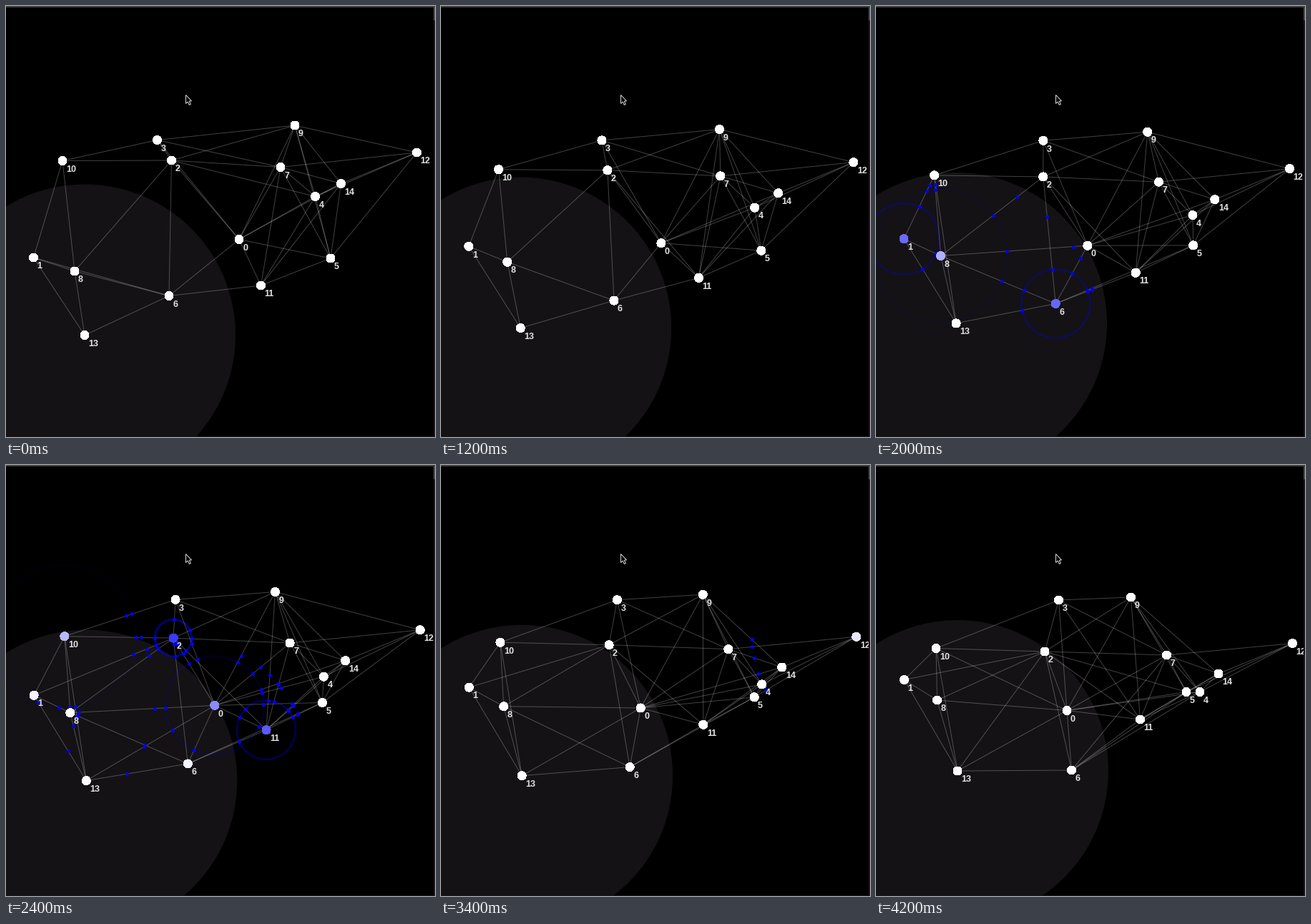
Recreate the animation shown at these times as a matplotlib script. Size 600 px wide and 603 px high, loop 4300 ms.

```python
from itertools import combinations

import matplotlib.pyplot as plt
import numpy as np
from matplotlib.animation import FuncAnimation
from matplotlib.collections import LineCollection
from matplotlib.patches import Circle, Polygon, Rectangle

W, H, DPI = 600, 603, 96
PX = 72 / DPI              # points per pixel
FRAMES, STEP = 43, 100
REACH = 211                # radio range of a node
SOURCE = 13                # node that sends the first pulse
WAVE = 1720                # pixels a pulse travels over the whole drift
LAUNCH = 0.396             # drift progress at the first pulse
LATENCY = 7 / WAVE         # pause before a node relays a pulse

# Start point and total drift of each node
NODES = np.array([
    (325.5, 326, -59, 17), (38, 351.5, 1, -51.5), (231, 215.5, 4.5, 45),
    (211, 187, 44, 1.5), (432, 266, 20.5, 51), (453.5, 352.5, -20, -35.5),
    (227.5, 405, 45.5, 21.5), (383.5, 225, 22.5, 40.5),
    (95.5, 370.5, -10.5, -42), (403.5, 166.5, -47.5, 18),
    (78.5, 216, 5, 40), (356, 390.5, 13, -35), (574, 204.5, 8, 44.5),
    (109.5, 460, 4, -32.5), (468, 248, 10.5, 43.5)])
N = len(NODES)
PAIRS = np.array(list(combinations(range(N), 2)))


def progress(t):
    """Share of the drift done at t seconds; it lags while pulses are busy."""
    return np.interp(t, [0, 2.0, 2.4, 3.4, 4.2], [0, 0.51, 0.58, 0.793, 1])


def positions(p):
    return NODES[:, :2] + NODES[:, 2:] * p


def flood():
    """Progress at which each node sends, each relaying the first it hears."""
    sent = np.full(N, np.inf)
    sent[SOURCE] = LAUNCH
    for p in np.arange(LAUNCH, 1, 0.001):
        pos = positions(p)
        dist = np.linalg.norm(pos[:, None] - pos, axis=2)
        reached = (dist < REACH) & (WAVE * (p - sent) >= dist)
        heard = reached.any(axis=1) & np.isinf(sent)
        sent[heard] = p + LATENCY
    return sent


def crossings(center, radius, a, b):
    """Points where a ring cuts segments with one end inside it."""
    a_in = np.linalg.norm(a - center, axis=1) < radius
    b_in = np.linalg.norm(b - center, axis=1) < radius
    cut = a_in != b_in
    inner = np.where(a_in[:, None], a, b)[cut]
    outer = np.where(a_in[:, None], b, a)[cut]
    d, f = outer - inner, inner - center
    qa, qb = (d * d).sum(1), (f * d).sum(1)
    qc = (f * f).sum(1) - radius ** 2
    s = (-qb + np.sqrt(qb * qb - qa * qc)) / qa
    return inner + s[:, None] * d


SENT = flood()

fig = plt.figure(figsize=(W / DPI, H / DPI), dpi=DPI, facecolor="black")
ax = fig.add_axes([0, 0, 1, 1])
ax.set_xlim(-0.5, W - 0.5)
ax.set_ylim(H - 0.5, -0.5)
ax.axis("off")

field = ax.add_patch(Circle((0, 0), REACH, fc="#141214", lw=0, zorder=1))
rings = [ax.add_patch(Circle((0, 0), 1, fill=False, ec="#0000ff",
                             lw=2.6 * PX, zorder=2)) for _ in range(N)]
links = LineCollection([], colors=[(1, 1, 1, 0.26)], linewidths=PX, zorder=3)
ax.add_collection(links)
dots = ax.scatter([], [], s=(5 * PX) ** 2, c="#0000ff", lw=0, zorder=4)
nodes = ax.scatter(*positions(0).T, s=(12 * PX) ** 2, c="white", lw=0,
                   antialiased=False, zorder=5)
labels = [ax.text(0, 0, str(i), family="Liberation Sans", weight="bold",
                  size=12.5 * PX, color="#e2e2e2", va="baseline", zorder=6)
          for i in range(N)]

# Window edges
for x, y, w, h, color in [(-0.5, -0.5, W, 2, "#3e3e3e"),
                          (597.5, 1.5, 2, H, "#1e121a"),
                          (597.5, 1.5, 2, 18, "#484848"),
                          (-0.5, 601.5, W, 1, "#181818")]:
    ax.add_patch(Rectangle((x, y), w, h, fc=color, lw=0, zorder=8))

# Mouse pointer
ARROW = np.array([(0, 0), (0, 12), (2.8, 9.5), (4.8, 14), (6.8, 13),
                  (4.8, 8.7), (8, 8.4)])
ax.add_patch(Polygon(ARROW + (251, 124), fc="black", ec="#d8d8d8",
                     lw=PX, zorder=9))


def draw(i):
    p = progress(i * STEP / 1000)
    pos = positions(p)
    radius = WAVE * (p - SENT)
    active = (radius > 0) & (radius < REACH)
    age = np.where(active, radius / REACH, 1)

    a, b = pos[PAIRS[:, 0]], pos[PAIRS[:, 1]]
    near = np.linalg.norm(a - b, axis=1) < REACH
    a, b = a[near], b[near]
    links.set_segments(np.stack([a, b], axis=1))
    field.center = pos[SOURCE]

    hits = [np.empty((0, 2))]
    for k, ring in enumerate(rings):
        ring.set_visible(bool(active[k]))
        if active[k]:
            ring.center = pos[k]
            ring.set_radius(radius[k])
            ring.set_alpha((1 - age[k]) ** 5)
            hits.append(crossings(pos[k], radius[k], a, b))
    dots.set_offsets(np.concatenate(hits))

    white = 1 - (1 - age) ** 2
    nodes.set_offsets(pos)
    nodes.set_facecolor(np.column_stack([white, white, np.ones(N)]))
    for label, (x, y) in zip(labels, pos):
        label.set_position((x + 5, y + 15.3))
    return [field, links, dots, nodes, *rings, *labels]


anim = FuncAnimation(fig, draw, frames=FRAMES, interval=STEP,
                     repeat=True, repeat_delay=0, blit=False)
plt.show()
```
